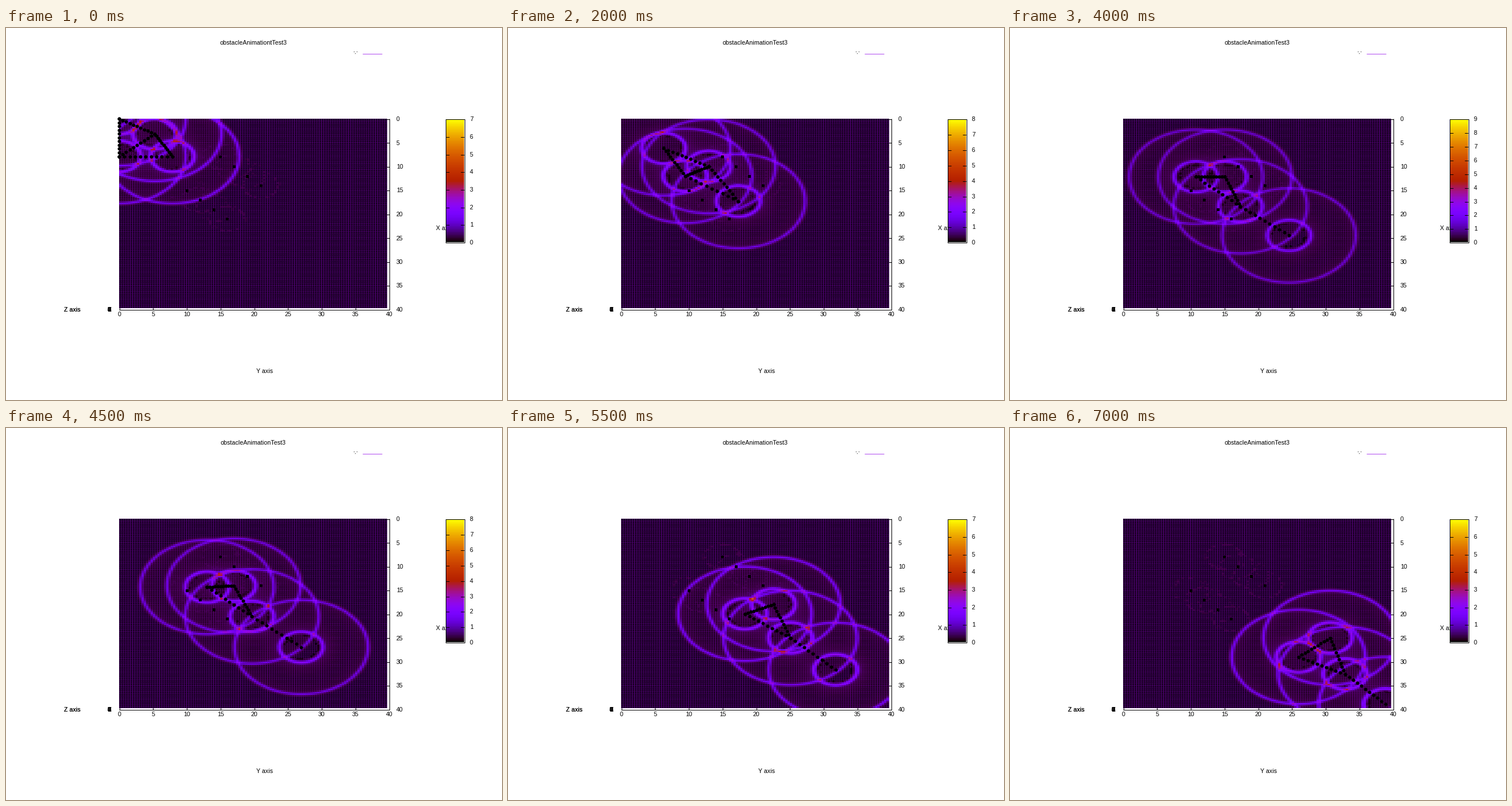
Animation, 864 px wide and 648 px high, one loop 7500 ms. Source, as a matplotlib script:

```python
import numpy as np
import matplotlib.pyplot as plt
from matplotlib.animation import FuncAnimation

W, H = 864, 648
N_FRAMES, STEP_MS = 15, 500
X0, Y0, SX, SY = 197, 158, 11.75, 8.3      # plot origin and pixels per unit
STEP = 1 / 3                               # grid spacing in units
CELLS = 119
MESH = np.array([148, 0, 211]) / 255

# way points of the four agents
KEY_T = [0, 2, 3, 4, 5, 6, 7]
PATHS = np.array([
    [(0, 0), (6.3, 6.2), (8.4, 8.2), (10.8, 12.2), (15.3, 16.5), (21.4, 23.4), (26, 29)],
    [(5.3, 3.2), (13, 10), (14.3, 10.9), (15.1, 12.2), (18.9, 15.9), (26.3, 20), (30.7, 25)],
    [(0, 7.9), (9.5, 12), (13.1, 14), (17.4, 18.4), (22, 22.6), (28.2, 27.4), (32.9, 32.6)],
    [(7.9, 7.9), (17.4, 17.3), (20, 19.9), (24.6, 24.5), (29.4, 29.4), (34.2, 34), (38.9, 38.9)],
])
EDGES = [(0, 1), (0, 2), (1, 2), (2, 3)]
TOPS = [7, 8, 7, 7, 8, 7, 8, 8, 9, 8, 8, 7, 8, 7, 7]
OBSTACLES = [(10 + 2 * k, 15 + 2 * k) for k in range(4)] + \
            [(15 + 2 * k, 8 + 2 * k) for k in range(4)]

plt.rcParams["font.family"] = "Liberation Sans"
plt.rcParams["font.size"] = 10.67
fig = plt.figure(figsize=(W / 72, H / 72), dpi=72, facecolor="white")
ax = fig.add_axes([0, 0, 1, 1])
ax.axis("off")


def palette(v):
    v = np.clip(v, 0, 1)
    rgb = np.stack([np.sqrt(v), v ** 3, np.sin(2 * np.pi * v)], -1)
    return np.clip(rgb, 0, 1)


def label(x, y, s, ha="center", **kw):
    return ax.text(x, y + 4, s, ha=ha, va="baseline", **kw)


def line(xs, ys, color="black", z=4):
    return ax.plot(xs, ys, color=color, lw=1, zorder=z, solid_capstyle="butt")[0]


def to_px(p):
    p = np.asarray(p)
    return X0 + p[..., 0] * SX, Y0 + p[..., 1] * SY


# sample points of the surface and the pixels it covers
g = (np.arange(CELLS) + 0.5) * STEP
gx, gy = np.meshgrid(g, g)
nx, ny = int(CELLS * STEP * SX) + 1, int(CELLS * STEP * SY) + 1
px = (np.arange(nx) + 0.5) / (SX * STEP)
py = (np.arange(ny) + 0.5) / (SY * STEP)
col = np.minimum(px.astype(int), CELLS - 1)
row = np.minimum(py.astype(int), CELLS - 1)


def coverage(u, pitch):
    return np.clip(1 - np.abs(u - np.round(u)) * pitch, 0, 1)


cover = np.maximum(coverage(px, SX * STEP)[None, :],
                   coverage(py, SY * STEP)[:, None])

rng = np.random.default_rng(3)
patchy = rng.random((CELLS, CELLS)) > 0.6
base = np.zeros((CELLS, CELLS))
for ox, oy in OBSTACLES:
    r = np.hypot(gx - ox, gy - oy)
    base = np.maximum(base, 0.12 * np.exp(-((r - 2.6) / 0.2) ** 2) * patchy)


def surface(agents):
    v = base.copy()
    hole = np.zeros_like(v)
    for ax_, ay_ in agents:
        r = np.hypot(gx - ax_, gy - ay_)
        v += 1.25 * np.exp(-((r - 9.9) / 0.3) ** 2)
        v += 1.75 * np.exp(-((r - 3.2) / 0.33) ** 2)
        v += 0.35 * np.exp(-(r - 3.2) / 0.9) * (r > 3.2)
        v += 0.10 * np.exp((r - 9.9) / 1.0) * (r < 9.9)
        hole = np.maximum(hole, (r > 2.3) & (r < 2.75) & patchy)
    v[v < 0.01] = 0
    return v, hole


def render(agents, top):
    v, hole = surface(agents)
    alpha = (0.58 - 0.33 * np.minimum(v, 1)) * (1 - 0.7 * hole)
    pick = np.ix_(row, col)
    a = (cover * alpha[pick])[..., None]
    return palette(v / top)[pick] * (1 - a) + MESH * a


def positions(t):
    return np.array([[np.interp(t, KEY_T, p[:, k]) for k in (0, 1)] for p in PATHS])


def links(agents, i):
    edges = EDGES + ([(1, 3)] if i < 6 else [])
    s = np.linspace(0, 1, 11)[:, None]
    return np.concatenate([agents[a] * (1 - s) + agents[b] * s for a, b in edges])


# fixed parts
title = label(430.5, 25, "")
label(451, 597, "Y axis")
label(749, 348, "X axis", ha="left", zorder=1)
for _ in range(2):
    label(101, 489.5, "Z axis", ha="left")
for d in range(8):
    label(180, 490, str(d))

line([X0, 667.5], [490.5, 490.5])
line([667.5, 667.5], [158, 491])
for v in range(0, 41, 5):
    x, y = X0 + v * SX + 0.5, Y0 + v * SY + 0.5
    line([x, x], [487, 490.5], z=1)
    line([663, 667.5], [y, y])
    label(x, 498.5, str(v))
    label(680, y - 0.5, str(v), ha="left")

ax.plot([606, 610.5, 608.3], [41, 41, 44], "s", ms=1.2, color="#444444", mew=0)
line([621, 655], [44.5, 44.5], color="#b04cf0")

heat = ax.imshow(np.zeros((ny, nx, 3)), extent=(X0, X0 + nx, Y0 + ny, Y0),
                 interpolation="nearest", zorder=2)
ox, oy = to_px(OBSTACLES)
ax.plot(ox, oy, "s", ms=5, color="black", mew=0, zorder=5)
dots, = ax.plot([], [], "o", ms=6, color="black", mew=0, zorder=6)

# colour bar
ramp = palette(np.linspace(1, 0, 128))[:, None]
ax.imshow(ramp, extent=(766, 798, 373, 159), interpolation="nearest", zorder=3)
line([765.5, 798.5, 798.5, 765.5, 765.5], [158.5, 158.5, 373.5, 373.5, 158.5])
bar_labels = [label(808, 373, str(k), ha="left") for k in range(10)]
bar_ticks = [(line([766, 772], [0, 0]), line([792, 798], [0, 0])) for _ in range(10)]

ax.set_xlim(0, W)
ax.set_ylim(H, 0)
ax.set_aspect("auto")


def draw(i):
    agents, top = positions(i * STEP_MS / 1000), TOPS[i]
    heat.set_data(render(agents, top))
    dots.set_data(*to_px(links(agents, i)))
    title.set_text("obstacleAnimationtTest3" if i == 0 else "obstacleAnimationTest3")
    for k, (text, ticks) in enumerate(zip(bar_labels, bar_ticks)):
        y = 373 - 214.5 * k / top
        text.set_y(y + 4)
        text.set_visible(k <= top)
        for tick in ticks:
            tick.set_ydata([round(y) + 0.5] * 2)
            tick.set_visible(k <= top)
    return heat, dots, title


anim = FuncAnimation(fig, draw, frames=N_FRAMES, interval=STEP_MS,
                     repeat=True, repeat_delay=0, blit=False)
plt.show()
```
